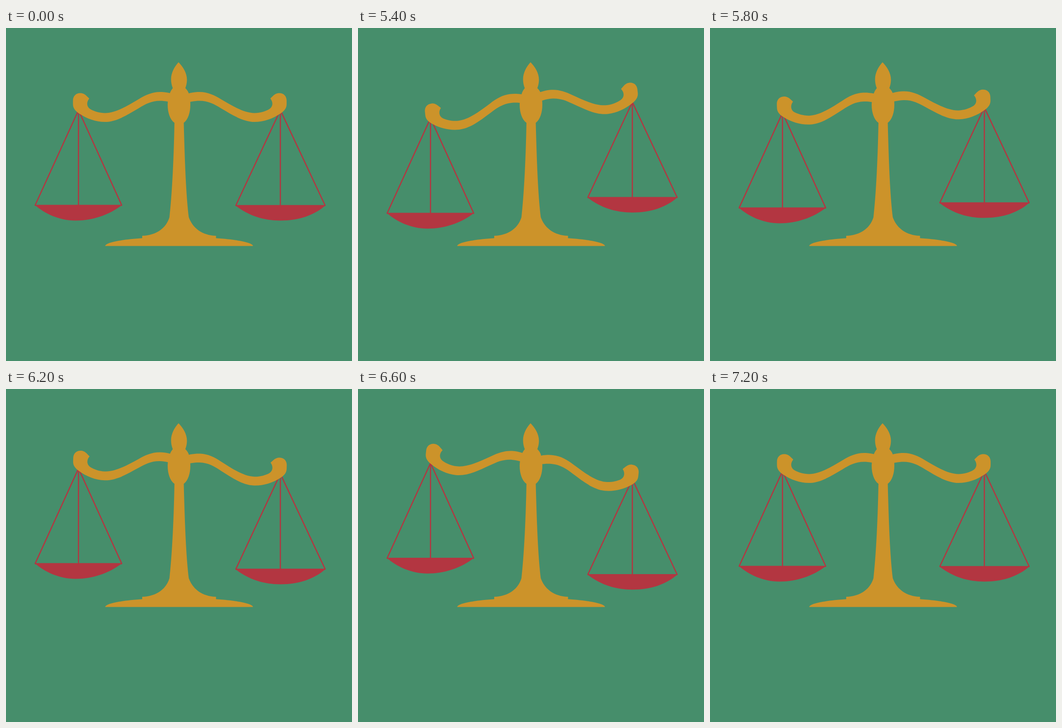
Write an HTML page that moves like this. It is 762 px wide and 734 px high and loops after 7400 ms.

```html
<!DOCTYPE html>
<html lang="en">
<head>
<meta charset="utf-8">
<title>Balance scales</title>
<style>
  html, body { margin: 0; width: 100%; height: 100%; overflow: hidden; background: #468e6b; }
  svg { display: block; width: 762px; height: 734px; }
  .gold { fill: #cc932a; }
  .pan { fill: #b33641; }
  .cord { fill: none; stroke: #b33641; stroke-width: 2.6; stroke-linejoin: bevel; }
</style>
</head>
<body>
<svg viewBox="0 0 762 734">
  <defs>
    <path id="arm" d="M372 147 L361 143.5 C352 141.5 345 141 339 141
      C322 141 306 148 292 157 C268 171 242 187.5 218 187.5
      C206 187.5 194 183.5 186 179 C177 173.500 177 163 183.300 155.500
      C177 149 172 143.500 164 143.500 C153 143.500 147.500 151 147.500 160
      V168 C147.500 177 153 183 161 188.500 C178 200 198 207 218 207
      C244 207 268 191 292 177 C307 167.500 321 160.500 339 160.500
      C345 160.500 350 161 357 162.300 L372 165 Z"/>
  </defs>

  <g id="left">
    <path class="cord" d="M64 391 L159.700 181 L255 391 Z M159.700 181 V391"/>
    <path class="pan" d="M63.500 390 H255.500 C228 412 190 424.500 153 424.500 C117 424.500 85 409 63.500 390 Z"/>
  </g>
  <g id="right">
    <path class="cord" d="M506 391.500 L604.200 181 L703 391.500 Z M604.200 181 V391.500"/>
    <path class="pan" d="M505 391 H703.500 C680 412 646 424.500 604 424.500 C566 424.500 533 413 505 391 Z"/>
  </g>

  <g id="beam" class="gold">
    <use href="#arm"/>
    <use href="#arm" transform="translate(765.5) scale(-1 1)"/>
  </g>

  <g class="gold">
    <path d="M380 75.500 C390 86 398.500 99 398.500 114 C398.500 121 397 127 395 132.500
      C399 136.500 401 140 402.500 144 C405 152 406 161 406 169 C406 186 401 202 391.500 209
      C393.500 285 396 363 402.500 417 C411 441 432 457 462.500 458 V463.300
      C510 466.500 543 473 544 480.500 H218.500 C219.500 473 252 466.500 300 463.300
      V458 C331 457 353 441 360 417 C366 363 369.500 285 371 209
      C361 202 356 186 356 169 C356 161 358 152 361 143.500
      C362.500 139.500 364.500 136 367.300 132.500 C365 127 363.500 120 363.500 113
      C363.500 99 371 85 380 75.500 Z"/>
  </g>
</svg>
<script>
  const LOOP = 7400, REST = 5000, STEP = 200;
  const TILT = [1, 2, 3, 2, 1, 0, -1, -2, -3, -2, -1, 0];
  const DEGREES = 2, DROP = 5.9;
  const part = id => document.getElementById(id);
  const beam = part('beam'), left = part('left'), right = part('right');

  function draw(now) {
    const t = now % LOOP;
    const tilt = t < REST ? 0 : TILT[Math.floor((t - REST) / STEP)];
    beam.setAttribute('transform', `rotate(${-tilt * DEGREES} 381.5 173)`);
    left.setAttribute('transform', `translate(0 ${tilt * DROP})`);
    right.setAttribute('transform', `translate(0 ${-tilt * DROP})`);
  }

  const start = performance.now();
  function tick() {
    draw(performance.now() - start);
    requestAnimationFrame(tick);
  }
  tick();
</script>
</body>
</html>
```
